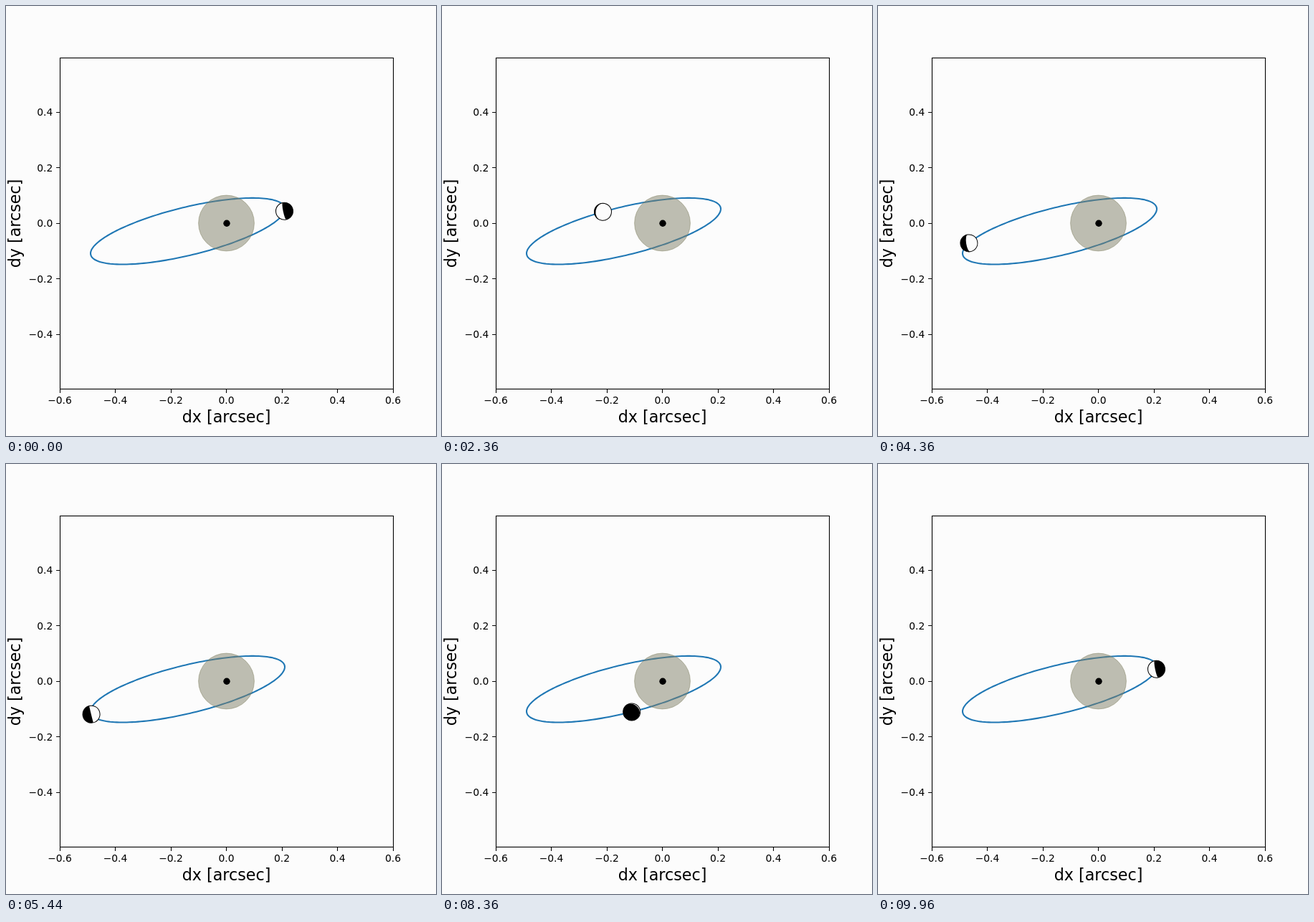
An HTML page that plays this animation: 600x600 px, repeating every 10 s.

```html
<!DOCTYPE html>
<html lang="en">
<head>
<meta charset="utf-8">
<title>Orbit with phases</title>
<style>
  html, body { margin: 0; width: 100%; height: 100%; overflow: hidden; background: #fcfcfc; }
  svg { display: block; width: 600px; height: 600px; }
  text { font: 13.89px "DejaVu Sans", sans-serif; text-anchor: middle; }
  .label { font-size: 22.22px; }
  .axes { fill: none; stroke: #000; stroke-width: 1.1; }
</style>
</head>
<body>
<svg viewBox="0 0 600 600">
  <path id="orbit" fill="none" stroke="#1f77b4" stroke-width="2.08"/>
  <g id="planet">
    <circle r="12" fill="#fcfcfc" stroke="#000"/>
    <path id="shade"/>
  </g>
  <circle cx="307.5" cy="303" r="38.9" fill="#808068" fill-opacity=".5" stroke="#808060" stroke-opacity=".5"/>
  <circle cx="308" cy="303.3" r="4.7"/>
  <rect class="axes" x="75.5" y="72.5" width="465" height="462"/>
  <path class="axes" id="ticks"/>
  <g id="numbers"></g>
  <text class="label" x="307.5" y="581">dx [arcsec]</text>
  <text class="label" transform="translate(20 303.5) rotate(-90)">dy [arcsec]</text>
</svg>
<script>
const $ = id => document.getElementById(id);
const STAR = [307.5, 303], UNIT = 387.5, R = 12;
const STEP = 40, FRAMES = 250;

// Projected orbit: centre plus conjugate half-axes (x, y, depth away from viewer)
const ECC = 0.4, SEMI_MAJOR = 139.5;
const CENTRE = [253.5, 314.2, 8.4];
const P = [135, -28, -21], Q = [11.4, -36.9, 121.8];

const orbitPoint = E => CENTRE.map((c, i) => c + P[i] * Math.cos(E) + Q[i] * Math.sin(E));

function eccentricAnomaly(M) {
  let E = M;
  for (let i = 0; i < 8; i++) {
    E -= (E - ECC * Math.sin(E) - M) / (1 - ECC * Math.cos(E));
  }
  return E;
}

function drawAxes() {
  let ticks = '', numbers = '';
  for (let i = -3; i <= 3; i++) {
    const value = i / 5;
    const name = value.toFixed(1).replace('-', '\u2212');
    const x = STAR[0] + value * UNIT, y = STAR[1] - value * UNIT;
    ticks += `M${Math.floor(x) + 0.5} 535v4.9`;
    numbers += `<text x="${x}" y="555">${name}</text>`;
    if (Math.abs(i) < 3) {
      ticks += `M75 ${Math.floor(y) + 0.5}h-4.9`;
      numbers += `<text x="65.3" y="${y + 5.3}" style="text-anchor:end">${name}</text>`;
    }
  }
  $('ticks').setAttribute('d', ticks);
  $('numbers').innerHTML = numbers;
}

function drawOrbit() {
  const points = Array.from({ length: 180 }, (_, i) => orbitPoint(i * Math.PI / 90).slice(0, 2));
  $('orbit').setAttribute('d', 'M' + points.join('L') + 'Z');
}

function drawPlanet(frame) {
  const E = eccentricAnomaly(2 * Math.PI * frame / (FRAMES - 1));
  const [x, y, depth] = orbitPoint(E);
  const cosPhase = depth / (SEMI_MAJOR * (1 - ECC * Math.cos(E)));
  const toStar = Math.atan2(STAR[1] - y, STAR[0] - x) * 180 / Math.PI;
  $('planet').setAttribute('transform', `translate(${x} ${y}) rotate(${toStar})`);
  $('shade').setAttribute('d', `M0 ${-R}A${R} ${R} 0 0 0 0 ${R}` +
    `A${Math.abs(R * cosPhase)} ${R} 0 0 ${cosPhase > 0 ? 1 : 0} 0 ${-R}Z`);
}

const start = performance.now();
function tick() {
  const elapsed = Math.max(0, performance.now() - start);
  drawPlanet(Math.floor(elapsed / STEP) % FRAMES);
  requestAnimationFrame(tick);
}

drawAxes();
drawOrbit();
tick();
</script>
</body>
</html>
```
